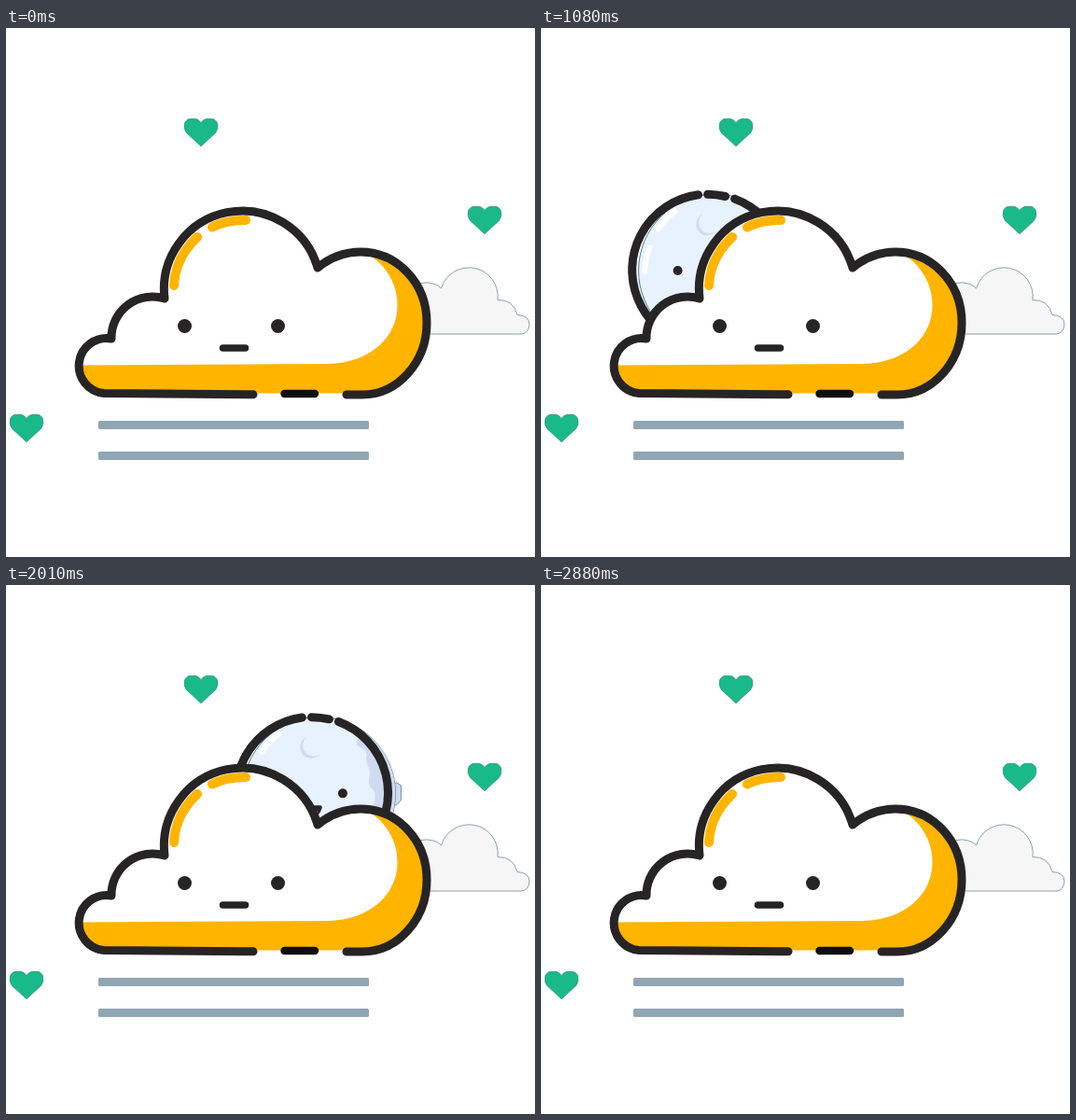
An HTML page that plays this animation: 567x567 px, repeating every 3300 ms.

```html
<!DOCTYPE html>
<html lang="en">
<head>
<meta charset="utf-8">
<title>Moon and cloud</title>
<style>
  html, body { margin: 0; width: 100%; height: 100%; overflow: hidden; background: #fff; }
  svg { display: block; width: 100vw; height: 100vh; }
  .ink { fill: none; stroke: #272426; stroke-width: 9; stroke-linecap: round; stroke-linejoin: round; }
  .thin { stroke-width: 7.5; }
  .dash { stroke: #0f0e0f; stroke-width: 8.4; }
  .dot { fill: #272426; }
  .gold { fill: #ffb400; }
  .shine { fill: none; stroke: #ffb400; stroke-width: 10; stroke-linecap: round; }
  .shade { fill: #d0dbf2; }
  .glow { fill: none; stroke: #fff; stroke-width: 6; stroke-linecap: round; }
  .heart { fill: #1ab98a; stroke: #2f8f7c; stroke-width: .7; }
  .bar { fill: #90a6b2; }
</style>
</head>
<body>
<svg viewBox="0 0 567 567">
  <defs>
    <path id="heart" d="M18 29.800 L2.500 15.500 Q-1 11 .5 5 Q2.500 .3 7 .3 H12 Q15.500 .8 18 4.500
      Q20.500 .8 24 .3 H29 Q33.500 .3 35.500 5 Q37 11 33.500 15.500 Z"/>
    <path id="cloud" d="M105 391.500 A29.550 29.550 0 1 1 113 333 A44 44 0 0 1 170 290 A83.900 83.900 0 0 1 334 257
      C346 247 362 240 380 240 C419 240 451 273 451 316 C451 358 420 393 382 393 Z"/>
    <clipPath id="inCloud"><use href="#cloud"/></clipPath>
    <clipPath id="inMoon"><circle cx="130" cy="225.500" r="82"/></clipPath>
  </defs>

  <path fill="#f6f6f6" stroke="#7e97a6" stroke-width=".9" d="M430 328 V280 Q446 270 458 274 Q463 275 466.500 279
    A31 31 0 0 1 527 291.500 Q544 291 548 307.500 Q561 308 561 318 Q560 327 553 328 Z"/>

  <g id="moon" visibility="hidden">
    <circle cx="122.500" cy="225" r="81.500" fill="#fff"/>
    <path d="M206 213 Q212 215 213 214 L218 217 V233 L213 238 H206 Z" fill="#d0dbf2" stroke="#58798c" stroke-width=".8"/>
    <path d="M46 234 L52 237 L62 266 L55 262 Q48 250 46 234 Z" fill="#e8f2ff"/>
    <circle cx="130" cy="225.500" r="82" fill="#e8f2ff" stroke="#426a80" stroke-width=".9"/>
    <g clip-path="url(#inMoon)">
      <path class="shade" d="M160 148 C169 156 176 161 171 169 C167 178 182 175 181 185 C179 196 187 198 184 208
        C181 222 192 219 190 230 C189 242 181 246 181 256 C181 268 176 270 172 280 C168 290 160 300 150 306 H220 V140 Z"/>
      <path class="shade" d="M117 165 A12 12 0 1 0 131.500 183 A10.500 10.500 0 0 1 117 165 Z"/>
      <path class="shade" d="M88 265 A6.300 6.300 0 1 0 95 274 A5.500 5.500 0 0 1 88 265 Z"/>
      <path class="shade" d="M148 251 A6.500 6.500 0 1 0 158 255 A5.200 5.200 0 0 1 148 251 Z"/>
      <path class="glow" d="M54.500 227 Q55 212 60 201 M69 181 Q77 169 87 162"/>
    </g>
    <path class="ink" d="M151 148.600 A81.500 81.500 0 1 1 112 144.200 M122 143.800 Q132 144 141 146"/>
    <circle class="dot" cx="90" cy="225.500" r="5"/>
    <circle class="dot" cx="155.500" cy="225.500" r="5"/>
    <path class="dot" d="M113.500 238.500 H131.500 Q134 238.500 133 242 Q130 251 122.500 251 Q115 251 112 242 Q111 238.500 113.500 238.500 Z"/>
    <path fill="#ee6655" d="M116 245 Q122.500 239.500 129 245 Q127 249.500 122.500 249.500 Q118 249.500 116 245 Z"/>
  </g>

  <use href="#cloud" fill="#fff"/>
  <path class="gold" clip-path="url(#inCloud)" d="M70 361.500 L345 360 C390 359 419.500 332 419.500 297
    C419.500 271 404 249 381 239 H460 V391.500 H70 Z"/>
  <path class="shine" d="M180 276 C181 255 190 238 205 224 M221 213.500 C232 208 244 206 257 206"/>
  <path class="ink" d="M265 392.800 L105 391.500 A29.550 29.550 0 1 1 113 333 A44 44 0 0 1 170 290 A83.900 83.900 0 0 1 334 257
    C346 247 362 240 380 240 C419 240 451 273 451 316 C451 358 420 393 382 393 H365"/>
  <path class="ink dash" d="M298.500 392 H331"/>
  <circle class="dot" cx="191.500" cy="319.500" r="7.500"/>
  <circle class="dot" cx="291.500" cy="319.500" r="7.500"/>
  <path class="ink thin" d="M232.500 343 H256.500"/>

  <rect class="bar" x="99" y="421" width="290" height="9" rx="1.500"/>
  <rect class="bar" x="99" y="454" width="290" height="9" rx="1.500"/>

  <use class="heart" href="#heart" x="191" y="97"/>
  <use class="heart" href="#heart" x="495" y="191"/>
  <use class="heart" href="#heart" x="4" y="414"/>
</svg>
<script>
  const LOOP = 3300, TICK = 30;
  // time, x, y of the moon; each pair of rows is one straight move or a rest
  const track = [
    [0, 132, 80.5], [540, 0, 0], [900, 0, 0], [1320, 132, 80.5],
    [1740, 141, 70.5], [2160, 241.2, -42.5], [2580, 241.2, -42.5], [2880, 141, 70.5]
  ];
  const moon = document.getElementById('moon');
  const isHidden = t => t === 0 || (t >= 1320 && t <= 1740) || t >= 2880;

  function draw(now) {
    const t = Math.floor((now % LOOP) / TICK) * TICK;
    const hidden = isHidden(t);
    moon.setAttribute('visibility', hidden ? 'hidden' : 'visible');
    if (!hidden) {
      const i = track.findIndex(row => row[0] > t) - 1;
      const [t0, x0, y0] = track[i], [t1, x1, y1] = track[i + 1];
      const p = (t - t0) / (t1 - t0);
      moon.setAttribute('transform', `translate(${x0 + (x1 - x0) * p} ${y0 + (y1 - y0) * p})`);
    }
  }

  const start = performance.now();
  function tick() {
    draw(performance.now() - start);
    requestAnimationFrame(tick);
  }
  tick();
</script>
</body>
</html>
```
